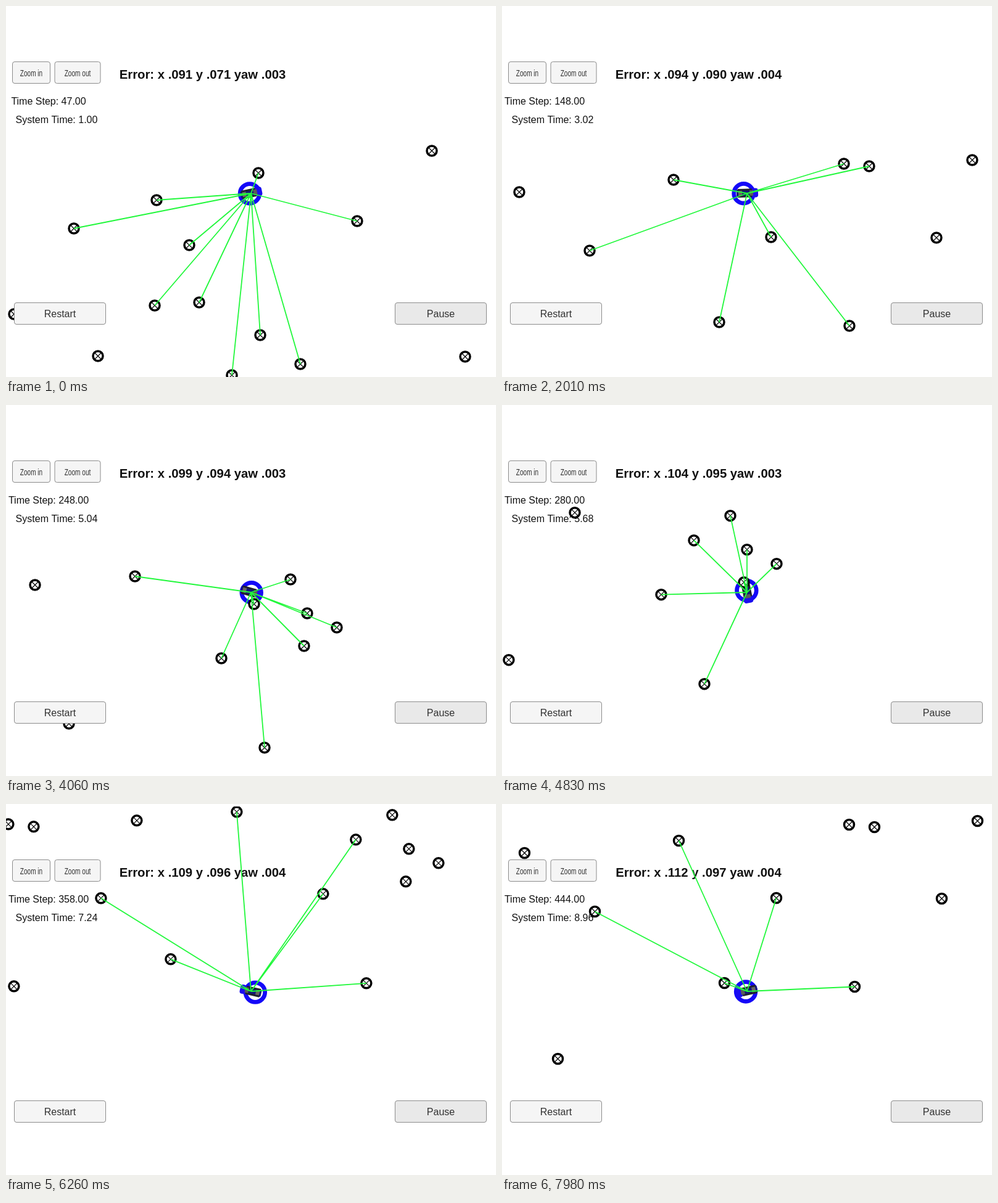
These frames come from a looping animation (794 px wide and 602 px high, 8 s). An HTML page with a canvas:

```html
<!DOCTYPE html>
<html>
<head>
<meta charset="utf-8">
<style>
html, body { margin: 0; width: 100%; height: 100%; overflow: hidden; background: #fff; }
canvas { display: block; }
</style>
</head>
<body>
<canvas id="stage" width="794" height="602"></canvas>
<script>
const ctx = document.getElementById('stage').getContext('2d');
const LOOP = 8000, RANGE = 300.4, LAST = 398, CAR = { x: 397, y: 304 };
const SANS = '"Liberation Sans", Arial, sans-serif';

// Map of the landmarks, relative to the first view.
const landmarks = [
  [690, 235], [409, 271], [244, 315], [110, 361], [297, 388], [241, 486], [313, 481],
  [569, 349], [412, 534], [477, 581], [366, 599], [149, 568], [744, 569], [13, 500],
  [804, 330], [940, 215], [1098, 308], [1014, 446], [1216, 189], [1257, 193],
  [1424, 183], [1366, 309], [1225, 452], [1586, 169], [1838, 174], [1779, 214],
  [1865, 229], [1913, 252], [1860, 282], [1726, 302], [1479, 408], [1796, 447]
];

// Waypoints of the drive: step, position, velocity per step.
const route = [
  [0, 0, 0, 5.7, -1.2],
  [101, 662, -67, 7.6, -0.3],
  [163, 1148, -104, 7.2, -0.65],
  [202, 1377, -109, 4.8, 1.35],
  [281, 1376, 165, -4.8, 1.35],
  [343, 1025, 121, -6.3, -0.35],
  [LAST, 653.5, 155.5, -7.1, 1.6]
];

// The picture refreshes seven times in 1.1 s, each time about 7.8 steps on.
function stepAt(t) {
  const tick = t < 120 ? 0 : 1 + Math.floor((t - 120) * 7 / 1100);
  return Math.floor(tick * 7.804 + 0.07);
}

// Cubic through p and q with end slopes a and b; gives value and slope.
function hermite(p, q, a, b, h, u) {
  const w = 1 - u;
  return [
    p * w * w * (1 + 2 * u) + q * u * u * (3 - 2 * u) + h * u * w * (a * w - b * u),
    6 * u * w * (q - p) / h + a * w * (1 - 3 * u) + b * u * (3 * u - 2)
  ];
}

function poseAt(step) {
  const i = Math.max(1, route.findIndex(r => r[0] >= step));
  const a = route[i - 1], b = route[i], h = b[0] - a[0], u = (step - a[0]) / h;
  const [x, vx] = hermite(a[1], b[1], a[3], b[3], h, u);
  const [y, vy] = hermite(a[2], b[2], a[4], b[4], h, u);
  return { x, y, heading: Math.atan2(vy, vx) };
}

// Errors settle quickly, then grow again through the U-turn.
function errorsAt(step) {
  const u = Math.min(1, Math.max(0, (step - 163) / 118));
  const turn = u * u * (3 - 2 * u);
  return [
    91 + 10.6 * step / LAST + 10 * turn,
    97.4 - 26.4 / (1 + step / 39.3) + 1.7 * turn,
    3.7 - 0.4 * Math.cos(step / 36)
  ].map(v => '.' + String(Math.round(v)).padStart(3, '0'));
}

function text(str, x, y, font, color = '#111', squeeze = 1) {
  ctx.save();
  ctx.translate(x, y);
  ctx.scale(squeeze, 1);
  ctx.font = font + ' ' + SANS;
  ctx.textAlign = 'center';
  ctx.fillStyle = color;
  ctx.fillText(str, 0, 0);
  ctx.restore();
}

function box(color, x, y, w, h, r = 0) {
  ctx.fillStyle = color;
  ctx.beginPath();
  ctx.roundRect(x, y, w, h, r);
  ctx.fill();
}

function button(label, x, y, w, fill, font, squeeze) {
  const h = 36;
  box(fill, x + 0.5, y + 0.5, w - 1, h - 1, 3.5);
  ctx.strokeStyle = '#8c8c8c';
  ctx.lineWidth = 1;
  ctx.stroke();
  text(label, x + w / 2, y + 24, font, '#323232', squeeze);
}

function ring(x, y, r, width, color) {
  ctx.beginPath();
  ctx.arc(x, y, r, 0, 2 * Math.PI);
  ctx.strokeStyle = color;
  ctx.lineWidth = width;
  ctx.stroke();
}

function car(heading) {
  ctx.save();
  ctx.translate(CAR.x, CAR.y - 0.5);
  ctx.rotate(heading);
  box('#14147a', -17, -6, 32, 12, 2);
  box('#20202c', -15, -7, 23, 3);
  box('#20202c', -15, 4, 23, 3);
  box('#1a0cf0', 8, -7.5, 10, 15, 4);
  box('#5a5a5a', 4, -4.5, 6, 9, 1);
  box('#6b6660', -14, -4, 6, 8);
  ctx.restore();
}

function landmark([x, y]) {
  box('#fff', x - 8, y - 8, 16, 16, 8);
  ring(x, y, 8, 3.5, '#000');
  ctx.lineWidth = 1.2;
  ctx.beginPath();
  for (const s of [-5, 5]) {
    ctx.moveTo(x - 5, y - s);
    ctx.lineTo(x + 5, y + s);
  }
  ctx.stroke();
}

function draw(t) {
  const step = stepAt(t), pose = poseAt(step);
  ctx.fillStyle = '#fff';
  ctx.fillRect(0, 0, 794, 602);

  const [ex, ey, yaw] = errorsAt(step);
  const counted = 47 + step - (step > 180); // the counter skips one step
  text(`Error: x ${ex} y ${ey} yaw ${yaw}`, 318.5, 117.5, 'bold 20.3px');
  text('Time Step: ' + counted.toFixed(2), 69, 160, '16px');
  text('System Time: ' + (1 + step / 50).toFixed(2), 82, 189.5, '16px');

  ctx.save();
  ctx.beginPath();
  ctx.rect(0, 4, 794, 598);
  ctx.clip();
  const lag = 3 + 5 * Math.cos(step / 36 - 1.75);
  ring(CAR.x - lag * Math.cos(pose.heading), CAR.y - lag * Math.sin(pose.heading), 15.8, 6.8, '#1408f8');
  car(pose.heading);
  const seen = landmarks.map(([x, y]) => [x - pose.x, y - pose.y]);
  seen.forEach(landmark);
  ctx.strokeStyle = '#22f83c';
  ctx.lineWidth = 1.8;
  ctx.beginPath();
  for (const [x, y] of seen) {
    if (Math.hypot(x - CAR.x, y - CAR.y) > RANGE) continue;
    ctx.moveTo(CAR.x, CAR.y);
    ctx.lineTo(x, y);
  }
  ctx.stroke();
  ctx.restore();

  button('Zoom in', 10, 90, 62, '#f5f5f5', '14px', 0.72);
  button('Zoom out', 78.5, 90, 75, '#f5f5f5', '14px', 0.72);
  button('Restart', 13, 481, 149, '#f5f5f5', '16px');
  button('Pause', 630, 481, 149, '#e9e9e9', '16px');
}

const start = performance.now();
function frame() {
  draw((performance.now() - start) % LOOP);
  requestAnimationFrame(frame);
}
frame();
</script>
</body>
</html>
```
